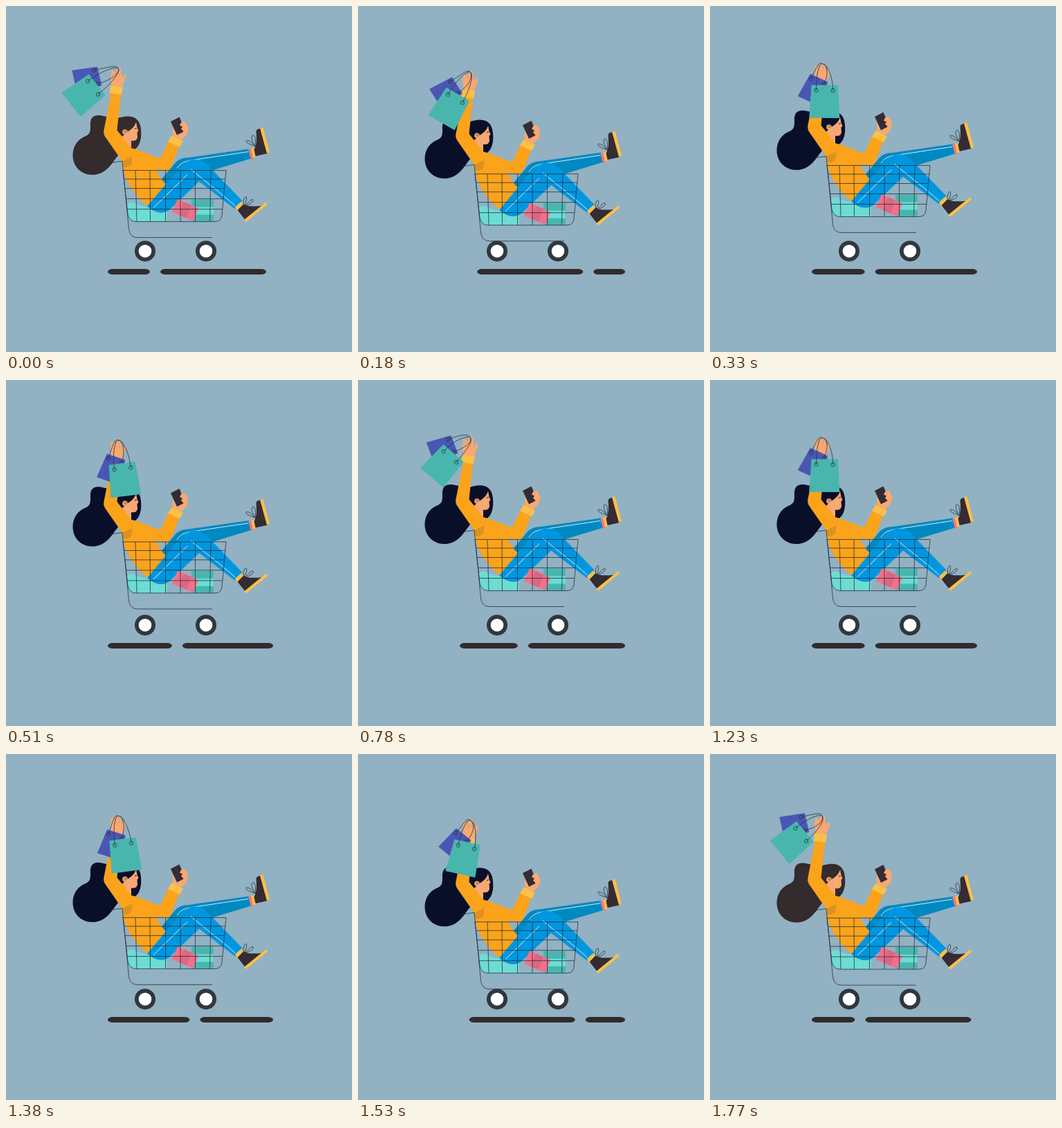
An HTML page with a canvas that plays this animation: 500x500 px, repeating every 1800 ms.

```html
<!DOCTYPE html>
<html lang="en">
<head>
<meta charset="utf-8">
<title>Cart ride</title>
<style>
html, body { margin: 0; width: 100%; height: 100%; overflow: hidden; background: #92b1c3; }
canvas { display: block; width: 100%; height: 100%; }
</style>
</head>
<body>
<canvas id="c" width="500" height="500"></canvas>
<script>
const ctx = document.getElementById('c').getContext('2d');
const LOOP = 1800, SWING = 900, BOB = 450;
const INK = '#26313d', DARK = '#352b33', SKIN = '#f7a873', ORANGE = '#fba31b',
  YELLOW = '#fbc046', BLUE = '#0097e0', BLUE2 = '#0089c0', TEAL = '#49b6ae',
  MINT = '#6cdcd4', PURPLE = '#4a56b4';

const smooth = x => x * x * (3 - 2 * x);
const ease = x => (smooth(x) + (1 - Math.cos(Math.PI * x)) / 2) / 2;

function fill(d, color) {
  ctx.fillStyle = color;
  ctx.fill(new Path2D(d));
}
function line(d, color = INK, width = 0.8) {
  ctx.strokeStyle = color;
  ctx.lineWidth = width;
  ctx.stroke(new Path2D(d));
}
function disc(x, y, r, color) {
  ctx.fillStyle = color;
  ctx.beginPath();
  ctx.arc(x, y, r, 0, 7);
  ctx.fill();
}

// Smooth periodic curve through values at the swing times
const times = [0, 180, 330, 510, 630, 780, 870];
function curve(v, t) {
  const n = times.length;
  const T = i => times[(i + n) % n] + SWING * Math.floor(i / n);
  const V = i => v[(i + n) % n];
  const slope = i => (V(i + 1) - V(i - 1)) / (T(i + 1) - T(i - 1));
  let i = n - 1;
  while (times[i] > t) i--;
  const h = T(i + 1) - T(i), s = (t - T(i)) / h, r = 1 - s;
  return V(i) * (1 + 2 * s) * r * r + slope(i) * h * s * r * r +
    V(i + 1) * s * s * (3 - 2 * s) - slope(i + 1) * h * s * s * r;
}

const bobKeys = [[0, 0], [120, -7.2], [190, 5.7], [325, -7.2], [440, 0], [450, 0]];
function bob(t) {
  t %= BOB;
  let i = 0;
  while (t >= bobKeys[i + 1][0]) i++;
  const [a, ya] = bobKeys[i], [b, yb] = bobKeys[i + 1];
  return 0.6 + ya + (yb - ya) * smooth((t - a) / (b - a));
}

const grip = { x: 162.5, y: 90 };
const teal = {
  x: [125.5, 140.3, 165.5, 168.5, 156.5, 133, 131.5],
  y: [117.5, 128, 128.5, 131, 129, 117.7, 116.5],
  a: [52, 30, 0.5, -7, 12.3, 40.6, 50],
  shape: 'M-19-7.5L19.5-7.5L22 40L-22 40Z', holes: [[-12, 0], [12, 0]], color: TEAL
};
const purple = {
  x: [132, 136, 145, 146, 142, 134.5, 137],
  y: [87, 97, 104.5, 109.5, 101.5, 86.5, 85.5],
  a: [77, 58, 25, 19, 39, 69, 77],
  shape: 'M0 0L28 0L31 37L-3 37Z', holes: [[4, 6], [24, 6]], color: PURPLE
};

function bag(b, t) {
  const x = curve(b.x, t), y = curve(b.y, t), a = curve(b.a, t) * Math.PI / 180;
  const c = Math.cos(a), s = Math.sin(a);
  ctx.save();
  ctx.translate(x, y);
  ctx.rotate(a);
  fill(b.shape, b.color);
  ctx.restore();
  const [p, q] = b.holes.map(([u, v]) => [x + u * c - v * s, y + u * s + v * c]);
  const up = ([px, py]) => `${px + s * 22} ${py - c * 22}`;
  const side = k => `${grip.x + c * k} ${grip.y + s * k}`;
  line(`M${p}C${up(p)} ${side(-6)} ${grip.x} ${grip.y}C${side(6)} ${up(q)} ${q}`);
  for (const [hx, hy] of [p, q]) {
    ctx.beginPath();
    ctx.arc(hx, hy, 2.7, 0, 7);
    ctx.stroke();
  }
}

function goods() {
  fill('M175 286Q181 279 188 286L198 289L233 289L233 311L188 311Q178 311 176 301Z', MINT);
  fill('M268 279H300V311H268Z', TEAL);
  fill('M268 290H300V301H268Z', MINT);
}

function head(hair) {
  fill('M122 172C121 161 127 157 135 157.5C148 159 154 164 165 160.5C178 157 190 158 194 172' +
    'C197 186 195 200 187 206L167 211C155 219 150 243 125 243.5C108 243.5 96.5 231 96.5 215' +
    'C96.5 200 106 191 114 188C122 185 122 180 122 172Z', hair);
  fill('M188 167L189.5 175L191.5 180L189.5 182L190 189C189 194 185 195 181 194L181 207L170 201' +
    'L168 188L176 181C181 178 186 174 188 167Z', SKIN);
  disc(172, 181.5, 3.8, SKIN);
  disc(172.5, 181, 2.4, '#b98a4f');
  line('M186 177L189 176', hair, 1);
}

function legs() {
  fill('M224 251L243 228C249 220 256 219 264 218.5L351 206L354 220L298 237L240 262Z', BLUE2);
  line('M247 234C253 224 262 223 276 221L350 210', '#d7ecf7', 1);
  fill('M350 207L354 206L358 220L354 221Z', '#f1728c');
  fill('M354 206L359 204L362 217L357 219Z', YELLOW);
  fill('M361.5 180Q363 176.5 368 176.5L378 212.5L360.5 216.5L358.5 207C363 199 362 190 361.5 180Z', DARK);
  fill('M367 176L371.5 175L381 210.5L377 212.5Z', YELLOW);
  line('M360 202C352 199 347 198 347 194C351 192 356 198 360 202C356 196 353 188 357 186C361 187 361 196 360 202');

  fill('M204 289L251 233C262 219 280 217 291 229L341.5 281L331 293L279 253L236 294Q222 304 204 289Z', BLUE);
  line('M213 291L262 243', '#d7ecf7', 1);
  line('M267 235C285 251 310 269 331 288', '#d7ecf7', 1);
  fill('M331 290L340 282L344 287L335 297Z', YELLOW);
  fill('M334.5 294.5L343 286Q352 290.5 370 288Q374 287 375.5 284L346 309Z', DARK);
  fill('M376 282.5L378 286L347 311.5L344 308.5Z', YELLOW);
  line('M344 288C342 281 344 275 347 275C349 279 346 284 344 288C350 285 353 279 357 279C358 284 351 287 344 288');
}

function torso() {
  fill('M168 222C168 246 180 268 206 290L231 259L216 236L184 206Z', ORANGE);
  fill('M178 204C196 208 210 216 223 219.5L235 194L251 201L238 233Q235 239 226 237L185 230Z', ORANGE);
  fill('M168 223L183 212L181 229Q174 234 168 232Z', '#db9220');
  fill('M152 125L166 127L160.5 179L183 207L182 217L168 224L143 188Q140 183 142 176Z', ORANGE);
}

function hands() {
  fill('M154 117C150 105 151 98 153 91L158 96L161 89Q165 86 166 92L168 103L171 98Q174 98 173.5 102L169.5 112L167 119Z', SKIN);
  line('M158 96L161 102M162 91L164 101', '#e08c62', 0.7);
  fill('M151 114L169 117L167 128L149.5 125.5Z', YELLOW);

  fill('M242 176C239 184 242 188 245 190L253 193C260 189 263.5 182 263 176L260 168Q257 164 254 169Z', SKIN);
  fill('M238 166.5L250.5 160L259 180L247 186Z', DARK);
  fill('M253 168Q258 164 260 169L263 176Q262 183 257 186L256 180L253 177L255 174L251 172Z', SKIN);
  fill('M239.5 186.5L256 195L251 203.5L234 195.5Z', YELLOW);
}

function basket() {
  fill('M248 278.5L278 292L270.5 310.5L240 297Z', '#f1708a');
  fill('M257 282.5L268 287.5L261 306L250 301.5Z', '#df6580');
  line('M168 237H318M170 249.5H317M172 263H315.5M173.5 278H314M175.5 293H312.5');
  line('M187 237L189 311M208 237L208.5 311M230.5 237V311M252 237V311M273.5 237V311M296 237L294.5 311');
  line('M169 237L176 300Q178 311 188 311H302Q311 311 312 302L318 237');
  line('M151 226L168 223.5L177.5 322Q179 334 190 334H298');
}

function wheel(x) {
  disc(x, 354.2, 15, '#30373d');
  disc(x, 354.2, 9.3, '#fff');
}

// Road dashes slide left, clipped to the track; ends are flat ellipses
function road(t) {
  const left = 147, right = 386, dash = 153, pitch = 168, cap = 7;
  ctx.fillStyle = '#322b2c';
  ctx.beginPath();
  for (let x = 223 - 3 * pitch * ease(t / SWING); x < right + pitch; x += pitch) {
    const a = Math.max(x - pitch, left), b = Math.min(x - pitch + dash, right);
    if (b - a > 2 * cap) ctx.roundRect(a, 380, b - a, 8, { x: cap, y: 4 });
  }
  ctx.fill();
}

function draw(now) {
  const t = now % LOOP, swing = t % SWING;
  const hair = t < 90 || t >= 1650 ? '#332b2c' : '#0a0f29';
  ctx.fillStyle = '#92b1c3';
  ctx.fillRect(0, 0, 500, 500);
  road(swing);
  ctx.save();
  ctx.translate(0, bob(t));
  goods();
  head(hair);
  legs();
  torso();
  // near thigh covers the hem of the jumper
  fill('M204 289L251 233L279 253L236 294Q222 304 204 289Z', BLUE);
  line('M213 291L262 243', '#d7ecf7', 1);
  hands();
  basket();
  bag(purple, swing);
  bag(teal, swing);
  ctx.restore();
  wheel(201);
  wheel(289);
}

const start = performance.now();
function tick() {
  draw(Math.max(0, performance.now() - start));
  requestAnimationFrame(tick);
}
tick();
</script>
</body>
</html>
```
